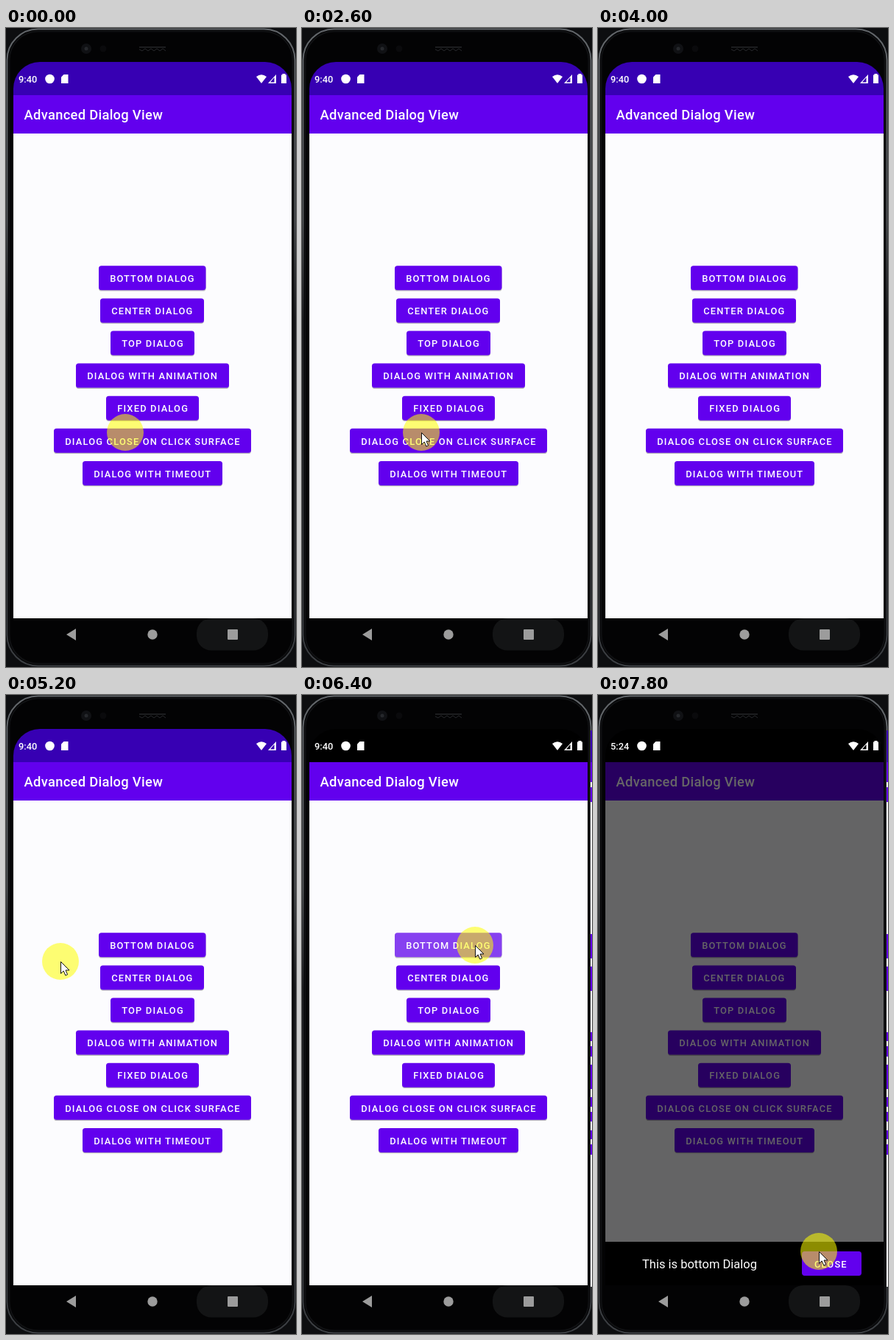
Write an HTML page that moves like this. It is 394 by 866 pixels and loops after 8000 ms.

```html
<!DOCTYPE html>
<html lang="en">
<head>
<meta charset="utf-8">
<title>Dialog demo</title>
<style>
html, body { margin: 0; width: 100%; height: 100%; overflow: hidden; background: #000; }
svg { display: block; width: 100%; height: 100%; }
text { font-family: Roboto, sans-serif; font-weight: 500; fill: #fff; white-space: pre; }
.btn { font-size: 12.83px; letter-spacing: 1.2px; }
.title { font-size: 18.33px; letter-spacing: .29px; }
.clock { font-size: 12.8px; }
.note { font-size: 16.5px; font-weight: 400; }
</style>
</head>
<body>
<svg viewBox="0 0 394 866">
  <defs>
    <linearGradient id="rim" x1="0" y1="0" x2="0" y2="1">
      <stop offset="0" stop-color="#62666a"/>
      <stop offset=".3" stop-color="#56595c"/>
      <stop offset=".46" stop-color="#1c1d20"/>
      <stop offset="1" stop-color="#3c3f43"/>
    </linearGradient>
    <clipPath id="screen"><path d="M10 91V82A36 36 0 0 1 46 46H352A36 36 0 0 1 388 82V800H10Z"/></clipPath>
  </defs>

  <rect width="394" height="866" fill="#0d0e10"/>
  <rect x="1.5" y="1.5" width="391" height="863" rx="42" fill="#030304" stroke="url(#rim)" stroke-width="2"/>
  <rect x="4.5" y="4.5" width="385" height="857" rx="39" fill="none" stroke="#101113" stroke-width="2"/>
  <circle cx="109" cy="28" r="7" fill="#101114"/>
  <circle cx="109" cy="28" r="2.5" fill="#26282c"/>
  <circle cx="132" cy="28" r="4.5" fill="#0a0a0c"/>
  <path d="M181 26H217" stroke="#1c1d1f" stroke-width="2"/>
  <path d="M181 29l4 2 4-3 4 3 4-3 4 3 4-3 4 3 4-3 4 3" fill="none" stroke="#28292c"/>

  <g clip-path="url(#screen)">
    <rect id="status" x="10" y="46" width="378" height="46" fill="#3700b3"/>
    <rect x="10" y="91" width="378" height="52" fill="#6200ee"/>
    <rect x="10" y="143" width="378" height="657" fill="#fcfcfe"/>
    <text class="title" x="24.6" y="124">Advanced Dialog View</text>
    <g id="buttons"></g>
    <rect id="shade" x="10" y="91" width="378" height="709"/>
    <g id="dialog">
      <rect x="10" y="741" width="378" height="59"/>
      <text class="note" x="60" y="777">This is bottom Dialog</text>
      <rect x="277" y="754" width="81" height="33" rx="3.7" fill="#6200ee"/>
      <text class="btn" x="294" y="775.5">CLOSE</text>
    </g>
  </g>

  <text id="clock" class="clock" x="17" y="73.7"></text>
  <g fill="#fff">
    <circle cx="59.5" cy="69" r="6.3"/>
    <path d="M78.5 63H84.5V75H75V66.5Z"/>
    <path d="M340 66Q347 60.5 354 66L347 75Z"/>
    <path d="M367 63V75H356Z"/>
    <path d="M375.5 63.5V62H379.5V63.5H381V75H374V63.5Z"/>
  </g>
  <path id="signal" d="M364.5 67V73.5H359Z" fill="#3700b3"/>

  <rect x="259" y="800" width="97" height="43.5" rx="20" fill="#131415"/>
  <g fill="#9c9c9c">
    <path d="M82 822L95 814V830Z"/>
    <circle cx="199" cy="822" r="6.7"/>
    <rect x="301" y="815" width="14" height="14" rx="1"/>
  </g>

  <g id="strip"></g>

  <g id="pointer">
    <circle r="25" fill="#ffff00" fill-opacity=".55"/>
    <path id="arrow" d="M.5 .5V16.5L4.2 13L6.8 19L9.6 17.8L7 12H12Z" fill="#fff" stroke="#111" stroke-width="1"/>
  </g>
</svg>
<script>
const LOOP = 8000, STEP = 200;
const CUT = 6200, PRESS = 6400, OPEN = 6600, OPENED = 7000;
const PURPLE = '#6200ee', DEEP = '#3700b3';
const NS = 'http://www.w3.org/2000/svg';
const $ = id => document.getElementById(id);

function add(parent, tag, attrs, label) {
  const el = document.createElementNS(NS, tag);
  for (const k in attrs) el.setAttribute(k, attrs[k]);
  if (label) el.textContent = label;
  parent.append(el);
  return el;
}

// label, left edge, width
const faces = [
  ['BOTTOM DIALOG', 126, 145.5],
  ['CENTER DIALOG', 128, 141],
  ['TOP DIALOG', 142, 114],
  ['DIALOG WITH ANIMATION', 95, 208],
  ['FIXED DIALOG', 136, 126],
  ['DIALOG CLOSE ON CLICK SURFACE', 65, 268],
  ['DIALOG WITH TIMEOUT', 104, 190]
].map(([label, x, width], i) => {
  const y = 322.3 + i * 44.1, g = $('buttons');
  const box = { x, width, height: 33, rx: 3.7 };
  add(g, 'rect', { ...box, y: y + 1.3, 'fill-opacity': .25 });
  const face = add(g, 'rect', { ...box, y, fill: PURPLE });
  add(g, 'text', { class: 'btn', x: x + 15.2, y: y + 21.7 }, label);
  return face;
});

// Sliver of a neighbouring window at the right edge
const bar = (y, height, fill) => add($('strip'), 'rect', { x: 392, y, width: 2, height, fill });
bar(48, 43, DEEP);
bar(91, 54, PURPLE);
bar(145, 657, '#fcfcfe');
for (const y of [324, 368, 457, 501, 545, 590]) bar(y, 33, PURPLE);
for (const y of [118, 469, 558, 602]) bar(y, 7, '#fff');

// time, x, y
const path = [
  [0, 162, 548], [2800, 162, 548], [3400, 430, 330], [4400, 430, 250],
  [4800, 240, 190], [5200, 74, 361], [5400, 74, 361], [6200, 235, 339],
  [7200, 235, 339], [7800, 300, 754], [8000, 300, 754]
];

const clamp = v => Math.max(0, Math.min(1, v));
const ease = v => v * v * (3 - 2 * v);

function pointerAt(t) {
  const i = path.findIndex(p => p[0] > t);
  const [t0, x0, y0] = path[i - 1], [t1, x1, y1] = path[i];
  const k = ease((t - t0) / (t1 - t0));
  return [x0 + (x1 - x0) * k, y0 + (y1 - y0) * k];
}

function draw(t) {
  const second = t >= CUT;
  const open = ease(clamp((t - OPEN) / (OPENED - OPEN)));
  const statusFill = second ? '#000' : DEEP;
  $('status').setAttribute('fill', statusFill);
  $('signal').setAttribute('fill', statusFill);
  $('strip').setAttribute('visibility', second ? 'visible' : 'hidden');
  $('clock').textContent = t >= OPEN ? '5:24' : '9:40';
  faces[0].setAttribute('fill', t >= PRESS && t < OPEN ? '#8640f0' : PURPLE);
  $('shade').setAttribute('opacity', .6 * open);
  $('dialog').setAttribute('transform', `translate(0 ${59 * (1 - open)})`);
  $('pointer').setAttribute('transform', `translate(${pointerAt(t)})`);
  $('arrow').setAttribute('visibility', t < STEP ? 'hidden' : 'visible');
}

const start = performance.now();
function tick() {
  const t = (performance.now() - start) % LOOP;
  draw(Math.floor(t / STEP) * STEP);
  requestAnimationFrame(tick);
}
tick();
</script>
</body>
</html>
```
